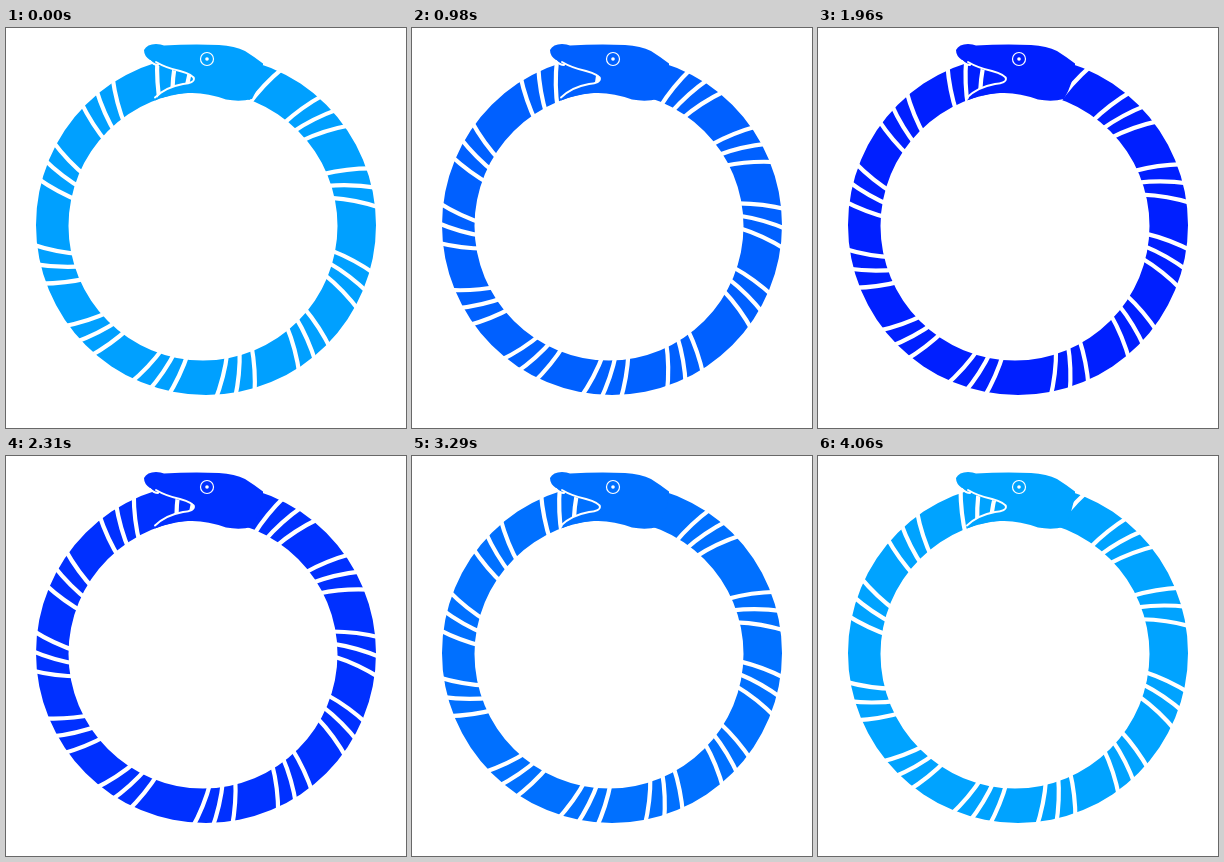
An HTML page that plays this animation: 400x400 px, repeating every 4.2 s.

```html
<!DOCTYPE html>
<html lang="en">
<head>
<meta charset="utf-8">
<title>Ouroboros</title>
<style>
  html, body { margin: 0; width: 100%; height: 100%; overflow: hidden; background: #fff; }
  svg { display: block; width: 100vw; height: 100vh; }
</style>
</head>
<body>
<svg id="snake" viewBox="0 0 400 400">
  <path fill="currentColor" fill-rule="evenodd"
    d="M30 197a170 170 0 1 0 340 0a170 170 0 1 0-340 0z
       M62.500 198a134.500 134.500 0 1 0 269 0a134.500 134.500 0 1 0-269 0z"/>
  <path id="stripes" fill="none" stroke="#fff" stroke-width="4.200"/>
  <path fill="currentColor"
    d="M152 37.500C148 36 147 34 144 32Q138 28 138 22Q141 16 150 16Q155 16 158 17.500
       Q185 16 213 17Q229 18 239 23Q247 28 257 35.500L257 37Q255 56 246 71
       Q234 74 220 71.500Q200 64 182 65Q163 66.500 149 72.500
       Q155 63 168 58Q180 56 186 54.500Q190 51 186 47Q168 43 152 37.500z"/>
  <g fill="none" stroke="#fff">
    <path stroke-width="1.900" stroke-linecap="round"
      d="M144 33Q148 37 152 37M150 34Q160 40 174 43Q188 47 188 51Q188 55 177 56Q160 59 149 69.500"/>
    <circle cx="201" cy="31" r="6.500" stroke-width="1.200"/>
    <circle cx="201" cy="31" r="1.800" fill="#fff" stroke="none"/>
  </g>
</svg>
<script>
  const LOOP = 4200, STEP = 70, STEPS = 59;
  const CX = 200, CY = 198;
  const snake = document.getElementById('snake');
  const stripes = document.getElementById('stripes');

  // Middle line of each band in degrees; the pattern repeats half a turn on.
  const bands = [-73.5, -44.4, -15.4, 19.6, 48.4, 77.7];
  const GAP = 6.1;

  function polar(r, deg) {
    const a = deg * Math.PI / 180;
    return (CX + r * Math.cos(a)).toFixed(2) + ' ' + (CY + r * Math.sin(a)).toFixed(2);
  }

  // The three lines of a band (k = -1, 0, 1) lean more and more.
  function line(mid, k) {
    const a = mid + k * GAP, lean = 2.9 + 0.5 * k;
    return `M${polar(128, a - lean)}Q${polar(152, a - 0.8)} ${polar(176, a + lean)}`;
  }

  stripes.setAttribute('d', [0, 180].flatMap(turn =>
    bands.flatMap(mid => [-1, 0, 1].map(k => line(turn + mid, k)))
  ).join(''));

  function draw(now) {
    const i = Math.min(STEPS - 1, Math.floor(now % LOOP / STEP));
    const green = Math.round(28 + 4.6 * Math.abs(i - 28.75));
    snake.style.color = `rgb(0, ${green}, 255)`;
    stripes.setAttribute('transform', `rotate(${i * 180 / STEPS} ${CX} ${CY})`);
  }

  const start = performance.now();
  function tick() {
    draw(performance.now() - start);
    requestAnimationFrame(tick);
  }
  tick();
</script>
</body>
</html>
```
